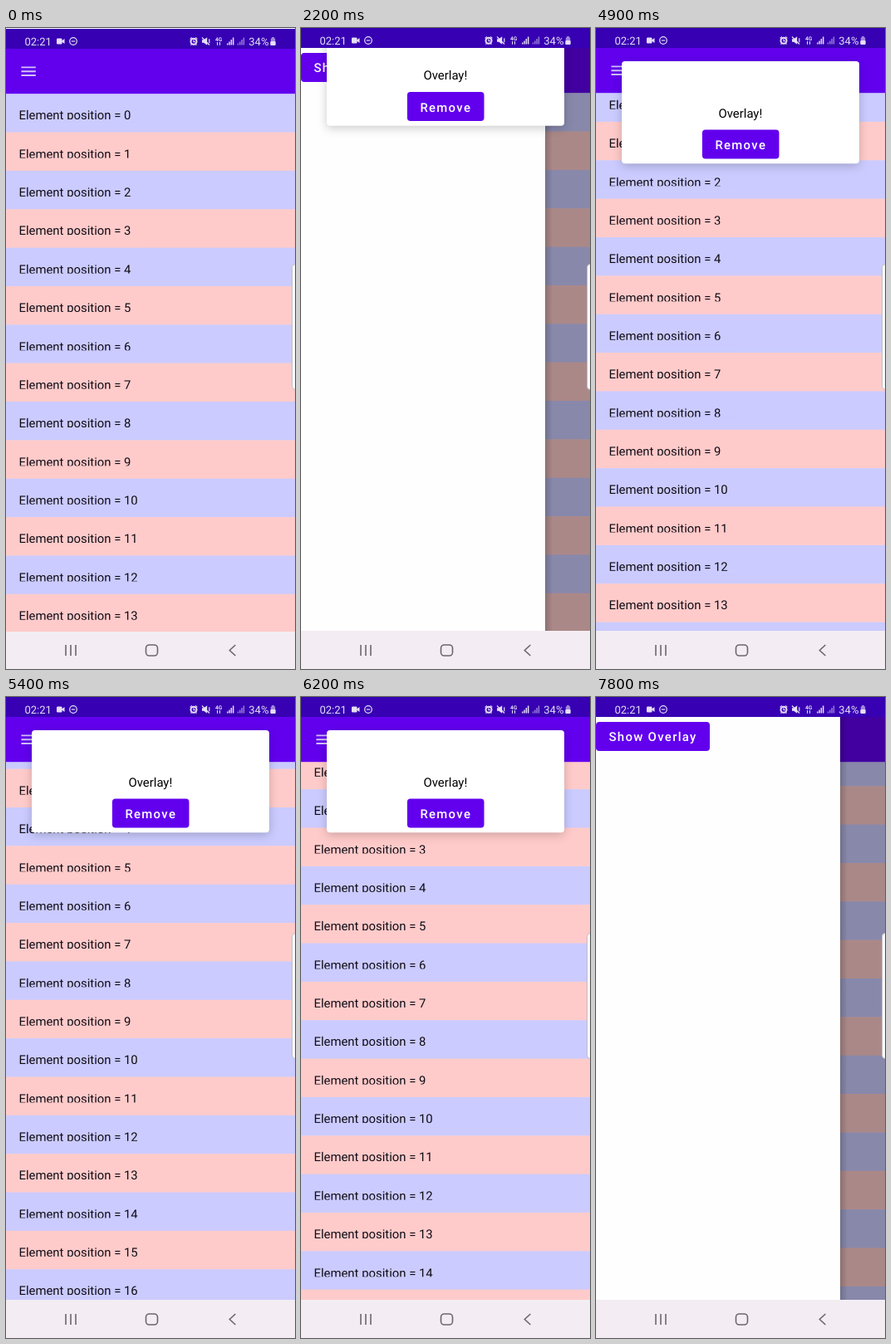
An HTML page that plays this animation: 348x772 px, repeating every 8 s.

```html
<!DOCTYPE html>
<html lang="en">
<head>
<meta charset="utf-8">
<title>Drawer and overlay</title>
<style>
  html, body { margin: 0; width: 100%; height: 100%; overflow: hidden; background: #fff; }
  svg { display: block; width: 348px; height: 772px; font: 14.89px Roboto, sans-serif; text-rendering: geometricPrecision; }
  .btn { font-weight: 500; letter-spacing: 1.33px; fill: #fff; }
  #card > rect:first-child { filter: drop-shadow(0 3px 6px rgba(0, 0, 0, .2)); }
</style>
</head>
<body>
<svg viewBox="0 0 348 772">
  <defs>
    <linearGradient id="shade">
      <stop offset="0" stop-opacity=".18"/>
      <stop offset="1" stop-opacity="0"/>
    </linearGradient>
    <clipPath id="navClip"><rect y="726" width="348" height="46"/></clipPath>
  </defs>

  <g id="page">
    <g id="list"></g>

    <rect y="24" width="348" height="54.2" fill="#6200ee"/>
    <path d="M18.4 46.4h17.4M18.4 51.2h17.4M18.4 56h17.4" stroke="#d3c2f8" stroke-width="1.9"/>

    <rect id="scrim" y="24" width="348" height="702"/>
    <g id="drawer">
      <rect x="294" y="24" width="9" height="702" fill="url(#shade)"/>
      <rect y="24" width="294" height="702" fill="#fefefe"/>
      <rect y="29.9" width="137" height="35" rx="4" fill="#6200ee"/>
      <text class="btn" x="15.5" y="53.2">Show Overlay</text>
    </g>

    <g id="card">
      <rect x="31" y="40" width="286" height="123.2" rx="4" fill="#fff"/>
      <text x="147.5" y="107.8">Overlay!</text>
      <rect id="remove" x="127.9" y="122.4" width="92.6" height="35" rx="4"/>
      <text class="btn" x="143.4" y="145.9">Remove</text>
    </g>

    <!-- status bar -->
    <rect width="348" height="24" fill="#3700b3"/>
    <g fill="#e6def6" stroke="none" font-size="13">
      <text x="22.5" y="19.6">02:21</text>
      <rect x="61" y="11.5" width="6.5" height="7" rx="1.2"/>
      <path d="M67 14.5l3.5-2.5v6l-3.5-2.5z"/>
      <g fill="none" stroke="#e6def6" stroke-width="1.2">
        <circle cx="81" cy="15" r="4.3"/>
        <path d="M78.8 15h4.4"/>
        <circle cx="226" cy="15.3" r="3.5" stroke-width="2"/>
        <path d="M226 13.3v2.3h1.8M221.6 12.4l2.2-2M230.4 12.4l-2.2-2M223.5 18.5l-1 1.2M228.5 18.5l1 1.2"/>
        <path d="M236 10.5l9 9M244.8 12.3v5"/>
      </g>
      <path d="M236 13.3h2.2l4-3v9.4l-4-3h-2.2z"/>
      <text x="252" y="14.8" font-size="6.5" font-weight="700">4G</text>
      <path d="M254.5 16v3.8M257.5 16v3.8" stroke="#e6def6"/>
      <path id="bars" d="M266 17.5h1.5v2h-1.5zM268.3 15.5h1.5v4h-1.5zM270.6 13h1.5v6.5h-1.5zM272.9 10.5h1.5v9h-1.5z"/>
      <use href="#bars" x="12.7" opacity=".55"/>
      <text x="292.3" y="19.6">34%</text>
      <path d="M320 10h3v1.5h1.2v3.5h-5.4v-3.5h1.2z" opacity=".6"/>
      <rect x="318.3" y="15" width="6.4" height="5" rx="1"/>
    </g>

    <rect y="726" width="348" height="46" fill="#f3edf3"/>
  </g>

  <!-- edge panel handle -->
  <rect x="344.5" y="284.5" width="10" height="151" rx="4" fill="#fafafa" stroke="#b5b0bb" stroke-width=".8"/>

  <!-- navigation keys -->
  <rect id="ripple" x="220.5" y="724" width="101.5" height="50" rx="34" ry="25" fill="#dfd9df" clip-path="url(#navClip)"/>
  <g fill="none" stroke="#6c676d" stroke-width="1.6">
    <path d="M72 743v13M78 743v13M84 743v13"/>
    <rect x="168.5" y="743" width="14" height="13" rx="4"/>
    <path d="M276.3 743l-7 6.5 7 6.5"/>
  </g>
</svg>

<script>
const $ = id => document.getElementById(id);
const LOOP = 8000, ROW = 46.35, TOP = 78.2, DRAWER = 294, SLIDE = 139;
const clamp = x => Math.min(1, Math.max(0, x));

$('list').innerHTML = Array.from({ length: 20 }, (_, i) => {
  const y = TOP + i * ROW, fill = i % 2 ? '#ffcbca' : '#cbcbff';
  // the lower strip cuts off the descenders
  return `<rect y="${y}" width="348" height="${ROW + .5}" fill="${fill}"/>
    <text x="15.47" y="${y + 31.2}" fill="#100c16">Element position = ${i}</text>
    <rect y="${y + 31}" width="170" height="6" fill="${fill}"/>`;
}).join('');

// cubic-bezier(.4, 0, .2, 1)
function ease(x) {
  let lo = 0, hi = 1, s = .5;
  for (let i = 0; i < 20; i++) {
    s = (lo + hi) / 2;
    const u = 1 - s;
    if (1.2 * u * u * s + .6 * u * s * s + s ** 3 < x) lo = s; else hi = s;
  }
  return s * s * (3 - 2 * s);
}
const tween = (t, start) => ease(clamp((t - start) / 256));

// critically damped spring from 0 to 1
function spring(t, start) {
  const k = Math.max(0, t - start) / 50;
  return 1 - (1 + k) * Math.exp(-k);
}

const drag = [[4800, 0], [4900, 11.3], [5100, 68], [5300, 118], [5500, 143],
  [5700, 147], [5900, 126], [6100, 82], [6300, 38], [6450, 21], [6550, 17.3]];
function scrollAt(t) {
  if (t <= drag[0][0]) return 0;
  const i = drag.findIndex(k => k[0] >= t);
  if (i < 0) return drag.at(-1)[1];
  const [t0, a] = drag[i - 1], [t1, b] = drag[i];
  return a + (b - a) * (t - t0) / (t1 - t0);
}

const move = (id, x, y) => $(id).setAttribute('transform', `translate(${x} ${y})`);
const show = (id, on) => $(id).setAttribute('visibility', on ? 'visible' : 'hidden');

function draw(now) {
  const t = now % LOOP;
  move('page', 0, t < 100 ? 1 : 0);
  move('list', 0, -scrollAt(t));

  const open = tween(t, 960) - tween(t, 3820) + tween(t, 7540);
  move('drawer', (open - 1) * DRAWER, 0);
  show('drawer', open > .001);
  $('scrim').setAttribute('opacity', .33 * open);

  move('card', 0, (spring(t, 2085) - 1 - spring(t, 6607)) * SLIDE);
  show('card', t > 2085 && t < 7000);
  $('remove').setAttribute('fill', t > 6607 ? '#4500c4' : '#6200ee');

  const fade = t < 3900 ? clamp((t - 3770) / 100) : 1 - clamp((t - 3950) / 600);
  $('ripple').setAttribute('opacity', fade);
}

function frame() {
  draw(performance.now());
  requestAnimationFrame(frame);
}
frame();
</script>
</body>
</html>
```
